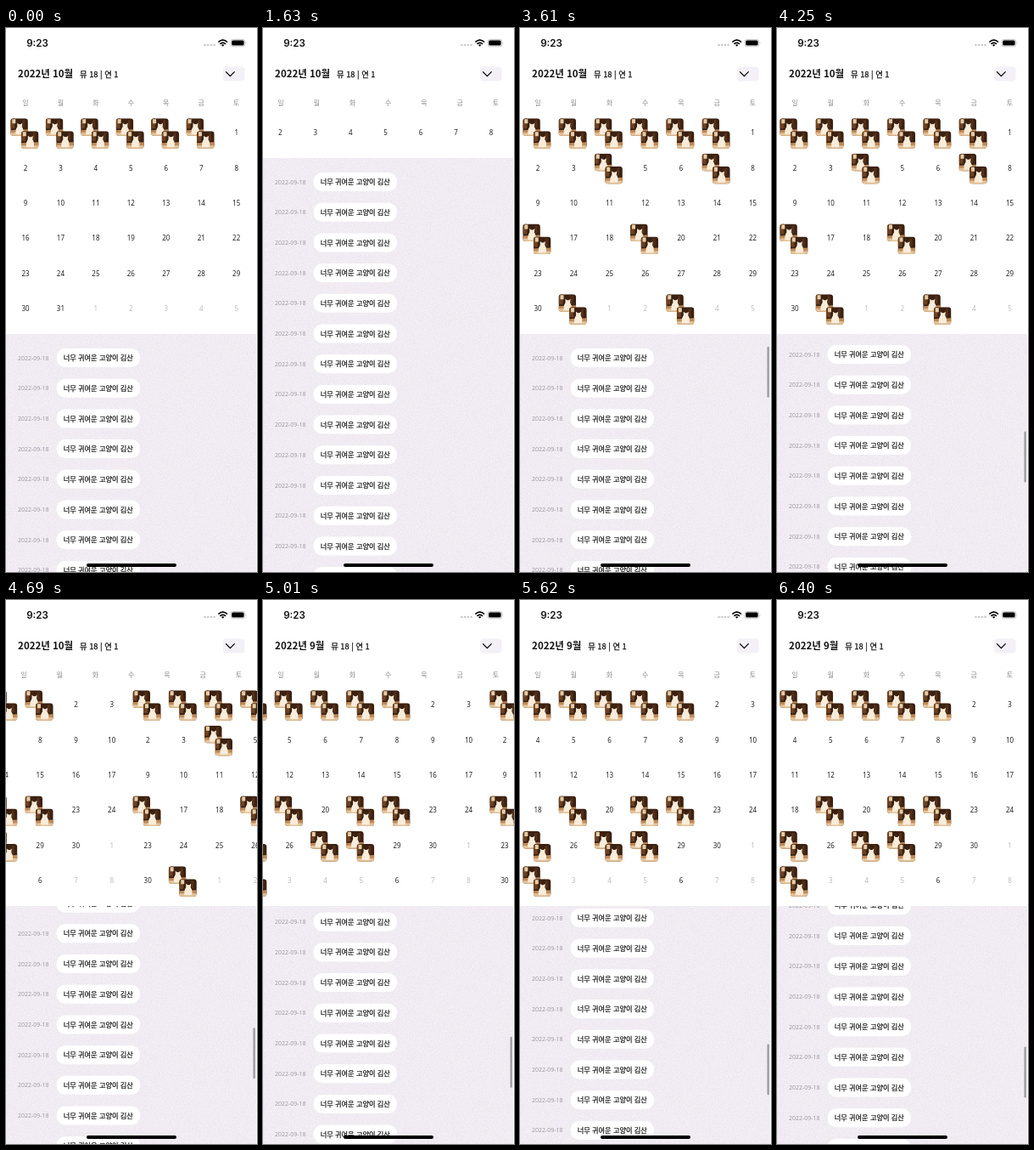
These frames come from a looping animation (296x640 px, 6440 ms). An HTML page:

```html
<!DOCTYPE html>
<html lang="ko">
<head>
<meta charset="utf-8">
<title>Calendar</title>
<style>
  html, body { margin: 0; width: 100%; height: 100%; overflow: hidden; background: #fff; }
  svg { display: block; width: 296px; height: 640px; }
  text { font-family: 'Noto Sans CJK KR', 'Noto Sans CJK', 'Noto Sans', sans-serif; fill: #111; }
  .clock { font: 600 11.6px Inter, sans-serif; }
  .title { font-size: 11.5px; font-weight: 700; }
  .count { font-size: 9.3px; font-weight: 500; stroke: #111; stroke-width: .25px; }
  .weekday { font-size: 8px; fill: #8c8c8c; text-anchor: middle; }
  .day { font: 8px 'Noto Sans', sans-serif; fill: #222; text-anchor: middle; }
  .day.outside { fill: #bcbcbc; }
  .date { font: 7px 'Noto Sans', sans-serif; fill: #a19da5; }
  .note { font-size: 8.2px; font-weight: 500; stroke: #111; stroke-width: .2px; }
</style>
</head>
<body>
<svg viewBox="0 0 296 640">
  <defs>
    <filter id="grain" x="0" y="0" width="1" height="1" color-interpolation-filters="sRGB">
      <feTurbulence type="fractalNoise" baseFrequency=".7" numOctaves="2" seed="4"/>
      <feColorMatrix values="0 0 0 0 1  0 0 0 0 1  0 0 0 0 1  .9 0 0 0 -.2"/>
    </filter>
    <clipPath id="round"><rect width="20.5" height="20.5" rx="3.5"/></clipPath>
    <g id="photo" clip-path="url(#round)">
      <rect width="21" height="21" fill="#3b2111"/>
      <path d="M0 0H5V12H0Z" fill="#6b4122"/>
      <path d="M2 1H6V6H2Z" fill="#e6cda6"/>
      <path d="M14 2H17V11H14Z" fill="#553018"/>
      <path d="M0 14L21 13V21H0Z" fill="#c08a58"/>
      <path d="M0 17H21V21H0Z" fill="#e3c298"/>
      <path d="M6 19Q5.5 13 8 10L8 5.5L10 7H12L14 5.5L13.5 10Q16 13 15 19Z" fill="#f8ecda"/>
    </g>
    <g id="pair">
      <use href="#photo" x="-17.7" y="-17"/>
      <use href="#photo" x="-5.2" y="-2"/>
    </g>
  </defs>

  <rect y="153" width="295" height="487" fill="#ebe5ee"/>
  <rect y="153" width="295" height="487" filter="url(#grain)"/>
  <g id="list"></g>
  <rect id="bar" x="291.5" width="2.3" height="60" rx="1.15" fill="#9c999f"/>
  <rect id="sheet" width="296" fill="#fff"/>
  <g id="calendar"></g>

  <text class="clock" x="24.2" y="21.7">9:23</text>
  <g fill="#c9c9c9">
    <circle cx="234.5" cy="20" r="1.3"/><circle cx="238.2" cy="20" r="1.3"/>
    <circle cx="241.9" cy="20" r="1.3"/><circle cx="245.6" cy="20" r="1.3"/>
  </g>
  <g fill="none" stroke="#000" stroke-width="1.7">
    <path d="M250.4 16.6Q255.7 11.8 261 16.6M252.4 18.8Q255.7 15.8 259 18.8"/>
    <path d="M254 19.9Q255.7 18.5 257.4 19.9L255.7 21.7Z" fill="#000" stroke="none"/>
  </g>
  <rect x="265" y="13.4" width="16.8" height="8.4" rx="2.5" fill="none" stroke="#bbb" stroke-width=".8"/>
  <rect x="266.2" y="14.6" width="14.4" height="6" rx="1.5"/>
  <path d="M282.8 16.2Q284.2 17.6 282.8 19Z" fill="#bbb"/>

  <text y="57.6"><tspan id="title" class="title" x="14.1"></tspan><tspan class="count" dx="7.8">뮤 18 | 연 1</tspan></text>
  <rect x="256" y="45.5" width="25.5" height="17" rx="4" fill="#f4f0f7"/>
  <path d="M259.2 51.4L264.4 56.6L269.6 51.4" fill="none" stroke="#000" stroke-width="1.3"/>
  <rect x="95" y="630.1" width="106" height="3.8" rx="1.9"/>
</svg>

<script>
const LOOP = 6440, ROW = 35.7, PAGE = 296, MONTH_TOP = 360, WEEK_TOP = 153;
const $ = id => document.getElementById(id);

function add(parent, tag, attrs = {}, text = '') {
  const node = document.createElementNS('http://www.w3.org/2000/svg', tag);
  for (const key in attrs) node.setAttribute(key, attrs[key]);
  node.textContent = text;
  return parent.appendChild(node);
}
const move = (node, x, y) => node.setAttribute('transform', `translate(${x} ${y})`);
const show = (node, on) => node.setAttribute('visibility', on ? 'visible' : 'hidden');

const wide = i => 21 + 42.25 * i;
const tight = i => 23 + 41.45 * i;

function weekdays(columnX) {
  const group = add($('calendar'), 'g');
  [...'일월화수목금토'].forEach((name, i) =>
    add(group, 'text', { class: 'weekday', x: columnX(i), y: 91.2 }, name));
  return group;
}

// `lead` is the number of cells before the first of the month.
function month(columnX, lead, length, photos, today) {
  const group = add($('calendar'), 'g');
  for (let i = 0; i < 42; i++) {
    const x = columnX(i % 7), y = 123.3 + 41.4 * Math.floor(i / 7);
    if (photos.includes(i)) {
      add(group, 'use', { href: '#pair', x, y });
      continue;
    }
    const day = i - lead + 1, outside = day > length && i !== today;
    add(group, 'text', { class: outside ? 'day outside' : 'day', x, y: y + 2.8 },
      day > length ? day - length : day);
  }
  return group;
}

function week(first) {
  const group = add($('calendar'), 'g');
  for (let i = 0; i < 7; i++)
    add(group, 'text', { class: 'day', x: 20.3 + 41.45 * i, y: 126.1 }, first + i);
  return group;
}

const firstWeek = [0, 1, 2, 3, 4, 5];
const tightDays = weekdays(tight), wideDays = weekdays(wide);
const initial = month(tight, 6, 31, firstWeek);
const october = month(wide, 6, 31, [...firstWeek, 9, 12, 21, 24, 36, 39]);
const september = month(wide, 4, 30, [0, 1, 2, 3, 4, 22, 24, 25, 28, 30, 31, 35], 39);
const folded = week(2);

for (let i = 0; i < 15; i++) {
  const row = add($('list'), 'g');
  move(row, 0, i * ROW);
  add(row, 'text', { class: 'date', x: 14, y: 2.5 }, '2022-09-18');
  add(row, 'rect', { x: 59.6, y: -11, width: 98.4, height: 22, rx: 10, fill: '#fff' });
  add(row, 'text', { class: 'note', x: 67.7, y: 3.1 }, '너무 귀여운 고양이 김산');
}

// The screen refreshes at these moments only: [first, last, count].
const ticks = [0, 1630, 2580];
for (const [first, last, count] of [[3610, 4250, 7], [4360, 4900, 6], [5010, 5620, 7], [5740, 6300, 6]])
  for (let i = 0; i < count; i++) ticks.push(Math.round(first + (last - first) * i / (count - 1)));
ticks.push(6400);

// Momentum scroll with exponential decay.
const scrollAt = t => Math.max(0, 711.5 - 243.4 * Math.exp((4250 - t) / 540));

// Page swipe: finger drag, then settle.
function swipeAt(t) {
  if (t <= 4360) return 0;
  if (t < 4690) return 150 * ((t - 4360) / 330) ** 1.4;
  return PAGE - 146 * Math.max(0, 1 - (t - 4690) / 760) ** 2.78;
}

function draw(t) {
  const start = t < 1630, weekly = !start && t < 2580, monthly = t >= 2580;
  const top = weekly ? WEEK_TOP : MONTH_TOP;
  const scroll = scrollAt(t), swipe = swipeAt(t);

  show(tightDays, start);
  show(wideDays, !start);
  show(initial, start);
  show(folded, weekly);
  show(october, monthly && swipe < PAGE);
  show(september, monthly && swipe > 0);
  move(october, swipe, 0);
  move(september, swipe - PAGE, 0);

  $('title').textContent = swipe > PAGE / 2 ? '2022년 9월' : '2022년 10월';
  $('sheet').setAttribute('height', top);
  move($('list'), 0, top + 28 - scroll % ROW);
  show($('bar'), t >= 3610);
  $('bar').setAttribute('y', 374.8 + scroll / 4.69);
}

let shown = -1;
const begin = performance.now();
function frame() {
  const t = Math.max(0, performance.now() - begin) % LOOP;
  const tick = ticks.findLast(k => k <= t);
  if (tick !== shown) draw(shown = tick);
  requestAnimationFrame(frame);
}
frame();
</script>
</body>
</html>
```
